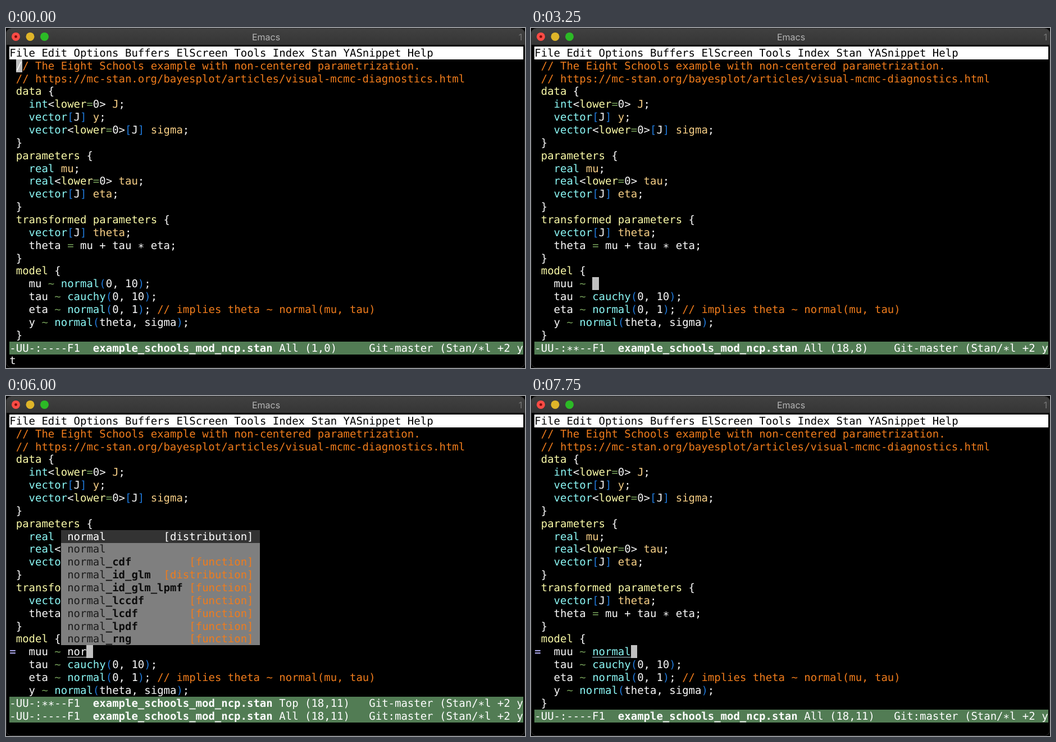
Write an HTML page with a canvas that moves like this. It is 924 px wide and 606 px high and loops after 8 s.

```html
<!DOCTYPE html>
<html lang="en">
<head>
<meta charset="utf-8">
<title>Editor session</title>
<style>
  html, body { margin: 0; width: 100%; height: 100%; overflow: hidden; background: #000; }
  canvas { display: block; }
</style>
</head>
<body>
<canvas id="stage" width="924" height="606"></canvas>
<script>
const ctx = document.getElementById('stage').getContext('2d');
const LOOP = 8000, STEP = 250;
const CELL_W = 80 / 7, CELL_H = 160 / 7, LEFT = 6.3, TOP = 33;
const FONT = '18.983px "DejaVu Sans Mono", monospace';
const BASELINE = 17.8, STAR_DROP = 4;

const COLORS = {
  plain: '#fafafa', comment: '#f07c1c', keyword: '#fbfba8', type: '#8cf8f6',
  variable: '#f7cf86', bracket: '#1f78d8', operator: '#76a15a'
};

const SOURCE = `// The Eight Schools example with non-centered parametrization.
// https://mc-stan.org/bayesplot/articles/visual-mcmc-diagnostics.html
data {
  int<lower=0> J;
  vector[J] y;
  vector<lower=0>[J] sigma;
}
parameters {
  real mu;
  real<lower=0> tau;
  vector[J] eta;
}
transformed parameters {
  vector[J] theta;
  theta = mu + tau * eta;
}
model {
  mu ~ normal(0, 10);
  tau ~ cauchy(0, 10);
  eta ~ normal(0, 1); // implies theta ~ normal(mu, tau)
  y ~ normal(theta, sigma);
}`.split('\n');

const EDIT_ROW = 18;
const SYNTAX = new RegExp([
  '(?<comment>//.*)',
  '(?<keyword>\\b(?:data|parameters|transformed|model|lower)\\b)',
  '(?<type>\\b(?:int|real|vector|normal|cauchy)\\b)',
  '(?<variable>(?<=^  (?:int|real|vector).* )\\w+(?=;))',
  '(?<bracket>[\\[\\]()])',
  '(?<operator>[=~])',
  '(?<plain>\\w+|[^\\w\\s])'
].join('|'), 'g');

const COMPLETIONS = [
  ['', 'distribution'], ['', ''], ['_cdf', 'function'], ['_id_glm', 'distribution'],
  ['_id_glm_lpmf', 'function'], ['_lccdf', 'function'], ['_lcdf', 'function'],
  ['_lpdf', 'function'], ['_rng', 'function']
];

// Typed contents of the edited line, each with its start time.
const TYPING = [
  [0, 'mu ~ normal(0, 10);'], [2000, 'mu'], [2500, 'muu'], [2750, 'muu '],
  [3000, 'muu ~'], [3250, 'muu ~ '], [3500, 'muu ~ n'], [3750, 'muu ~ no'],
  [4000, 'muu ~ nor'], [6250, 'muu ~ normal']
];

const cellX = col => LEFT + col * CELL_W;
const cellY = row => TOP + row * CELL_H;

function fillCells(col, row, cols, color) {
  const x = Math.round(cellX(col)), y = Math.round(cellY(row));
  ctx.fillStyle = color;
  ctx.fillRect(x, y, Math.round(cellX(col + cols)) - x, Math.round(cellY(row + 1)) - y);
}

// Words are placed on the cell grid; asterisks sit at the middle of the line.
function write(text, col, row, color, bold = false) {
  ctx.font = (bold ? 'bold ' : '') + FONT;
  ctx.fillStyle = color;
  for (const { 0: word, index } of text.matchAll(/\*|[^\s*]+/g)) {
    const drop = word === '*' ? STAR_DROP : 0;
    ctx.fillText(word, cellX(col + index), Math.round(cellY(row) + BASELINE) + drop);
  }
}

function writeCode(line, row) {
  for (const match of line.matchAll(SYNTAX)) {
    const kind = Object.keys(match.groups).find(name => match.groups[name] !== undefined);
    write(match[0], match.index + 1, row, COLORS[kind]);
  }
}

function disc(x, y, r, color) {
  ctx.fillStyle = color;
  ctx.beginPath();
  ctx.arc(x, y, r, 0, Math.PI * 2);
  ctx.fill();
}

function drawWindow() {
  ctx.fillStyle = '#000';
  ctx.fillRect(0, 0, 924, 606);
  const bar = ctx.createLinearGradient(0, 0, 0, 30);
  bar.addColorStop(0, '#414141');
  bar.addColorStop(1, '#353535');
  ctx.fillStyle = bar;
  ctx.beginPath();
  ctx.roundRect(0, 1, 924, 29, [9, 9, 0, 0]);
  ctx.fill();
  ctx.strokeStyle = '#2c2c2c';
  ctx.lineWidth = 1;
  ctx.beginPath();
  ctx.roundRect(0.5, 0.5, 923, 605, 9);
  ctx.stroke();

  disc(17.5, 15.4, 7.5, '#fb4b45');
  disc(17.5, 15.4, 2.4, '#7d0b08');
  disc(43, 15.4, 7.5, '#dfb529');
  disc(68.5, 15.4, 7.5, '#2cba26');
  ctx.font = '16px Inter, sans-serif';
  ctx.textAlign = 'center';
  ctx.fillStyle = '#b5b5b5';
  ctx.fillText('Emacs', 463, 21.5);
  ctx.fillStyle = '#777';
  ctx.fillText('1', 916, 21.5);
  ctx.textAlign = 'left';

  fillCells(0, 0, 80, '#fff');
  write('File Edit Options Buffers ElScreen Tools Index Stan YASnippet Help', 0, 0, '#000');
}

function drawModeline(row, { modified, extent = 'All', position, branch }) {
  fillCells(0, row, 80, '#527c54');
  write(`-UU-:${modified ? '**' : '--'}--F1`, 0, row, '#fff');
  write('example_schools_mod_ncp.stan', 13, row, '#fff', true);
  write(`${extent} (${position})`, 42, row, '#fff');
  write(`Git${branch}master (Stan/*l +2 y`, 56, row, '#fff');
}

function drawPopup() {
  COMPLETIONS.forEach(([suffix, kind], i) => {
    const row = 9 + i, selected = i === 0;
    fillCells(8, row, 31, selected ? '#333' : '#7f7f7f');
    write('normal', 9, row, selected ? '#fff' : '#1c1c1c');
    write(suffix, 15, row, '#0c0c0c', true);
    if (kind) {
      const label = `[${kind}]`;
      write(label, 38 - label.length, row, selected ? '#fff' : COLORS.comment);
    }
  });
}

function cursorAt(t, typed) {
  if (t < 1250) return { row: 1 + Math.floor(17 * t / 1250), col: 0 };
  if (t < 2000) return { row: EDIT_ROW, col: t < 1500 ? 0 : t < 1750 ? 2 : 4 };
  return { row: EDIT_ROW, col: 2 + typed.length };
}

function draw(t) {
  const typed = TYPING.findLast(([start]) => t >= start)[1];
  const lines = SOURCE.slice();
  lines[EDIT_ROW - 1] = '  ' + typed;
  const cursor = cursorAt(t, typed);
  const completing = t >= 4500 && t < 6250;
  const saving = t >= 6000 && t < 6250;
  const saved = t >= 7750;
  const position = t >= 4000 ? '18,11' : `${cursor.row},${cursor.col}`;

  drawWindow();
  lines.forEach((line, i) => writeCode(line, i + 1));

  fillCells(cursor.col + 1, cursor.row, 1, '#c0c0c0');
  write(lines[cursor.row - 1][cursor.col] || '', cursor.col + 1, cursor.row, '#fff');

  if (completing || saved) {
    ctx.fillStyle = saved ? '#a5c8d2' : '#d8d8d8';
    ctx.fillRect(cellX(9), Math.round(cellY(EDIT_ROW)) + 21, (saved ? 6 : 3) * CELL_W, 1);
  }
  if (completing) drawPopup();
  if (t >= 6000) write('=', 0, EDIT_ROW, '#aaa6e8', true);

  if (saving) drawModeline(22, { modified: true, extent: 'Top', position, branch: '-' });
  drawModeline(23, {
    modified: t >= 2000 && !saving && !saved,
    position,
    branch: t >= 6000 ? ':' : '-'
  });
  if (t < STEP) write('t', 0, 24, COLORS.plain);
}

ctx.textRendering = 'geometricPrecision';
const start = performance.now();
function tick() {
  const t = (performance.now() - start) % LOOP;
  draw(Math.floor(t / STEP) * STEP);
  requestAnimationFrame(tick);
}
tick();
</script>
</body>
</html>
```
